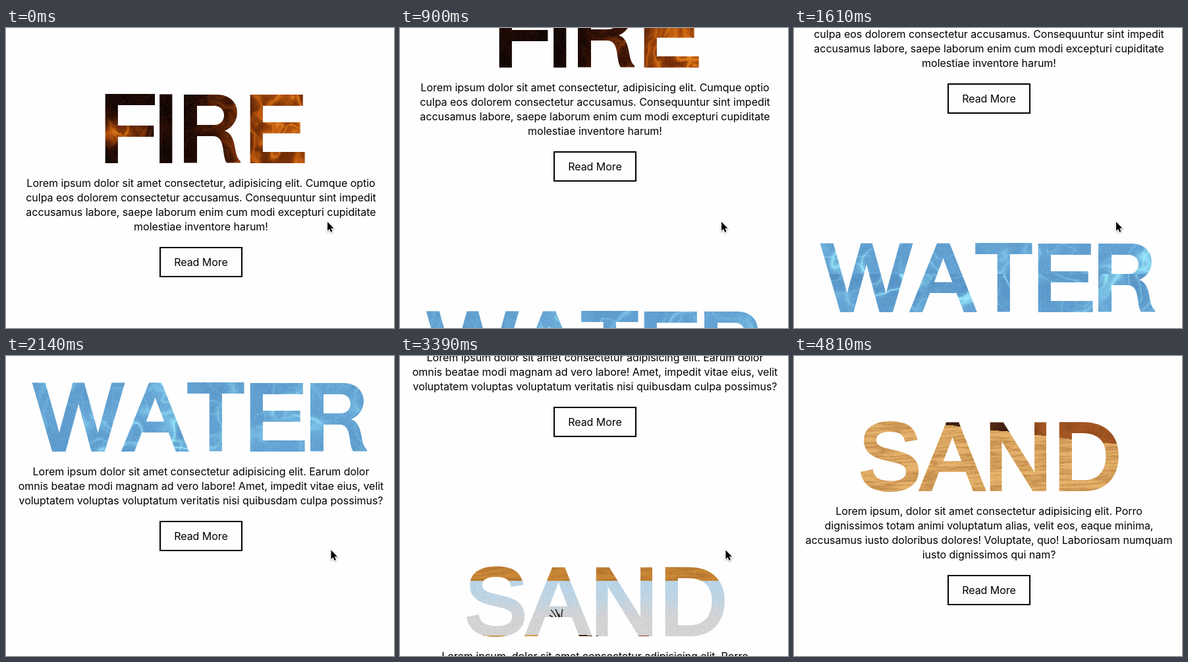
These frames come from a looping animation (589x455 px, 4990 ms). An HTML page with a canvas:

```html
<!DOCTYPE html>
<html lang="en">
<head>
<meta charset="utf-8">
<title>Fire, Water, Sand</title>
<style>
  html, body { margin: 0; width: 100%; height: 100%; overflow: hidden; background: #fefefe; }
  canvas { display: block; }
</style>
</head>
<body>
<canvas id="stage" width="589" height="455"></canvas>
<script>
const W = 589, H = 455, LOOP = 4990, BG = '#fefefe';
const ctx = document.getElementById('stage').getContext('2d');

// Noise
const hash = (x, y) => {
  let n = Math.imul(x, 374761393) + Math.imul(y, 668265263);
  n = Math.imul(n ^ (n >>> 13), 1274126177);
  return ((n ^ (n >>> 16)) >>> 0) / 4294967296;
};
const clamp = v => Math.min(1, Math.max(0, v));
const mix = (a, b, t) => a + (b - a) * t;
const ease = (a, b, v) => { const t = clamp((v - a) / (b - a)); return t * t * (3 - 2 * t); };
function noise(x, y) {
  const i = Math.floor(x), j = Math.floor(y), u = ease(0, 1, x - i), v = ease(0, 1, y - j);
  return mix(mix(hash(i, j), hash(i + 1, j), u), mix(hash(i, j + 1), hash(i + 1, j + 1), u), v);
}
const fbm = (x, y) => noise(x, y) * .55 + noise(x * 2.1, y * 2.1) * .3 + noise(x * 4.3, y * 4.3) * .15;
const ridge = n => 1 - Math.abs(2 * n - 1);
const blend = (a, b, t) => a.map((v, i) => mix(v, b[i], clamp(t)));
const ramp = (stops, v) => {
  const p = clamp(v) * (stops.length - 1), i = Math.min(stops.length - 2, Math.floor(p));
  return blend(stops[i], stops[i + 1], p - i);
};

// Textures stay fixed to the stage while the letters scroll over them
function texture(height, shade, grain, extra) {
  const c = document.createElement('canvas');
  c.width = W; c.height = height;
  const g = c.getContext('2d'), img = g.createImageData(W, height);
  for (let y = 0, k = 0; y < height; y++)
    for (let x = 0; x < W; x++, k += 4) {
      const d = (hash(x + 999, y + 77) - .5) * grain;
      shade(x, y).forEach((v, i) => img.data[k + i] = v + d);
      img.data[k + 3] = 255;
    }
  g.putImageData(img, 0, 0);
  if (extra) extra(g);
  return ctx.createPattern(c, 'repeat');
}

const EMBER = [[8, 3, 2], [50, 17, 5], [122, 50, 8], [196, 94, 14], [242, 160, 52]];
function fireShade(x, y) {
  const wx = x / 34 + 2 * fbm(x / 50, y / 50), wy = y / 48 + 2 * fbm(x / 45 + 9, y / 45);
  const lick = ridge(fbm(wx, wy)) ** 5;
  const glow = ease(240, 430, x) * .45 + .45 * Math.exp(-(((x - 175) / 42) ** 2 + ((y - 157) / 22) ** 2));
  return ramp(EMBER, .06 + glow * (.7 + .4 * fbm(x / 20, y / 20)) + lick * (.08 + glow * .75));
}

function waterShade(x, y) {
  const wx = x / 42 + 1.6 * fbm(x / 60, y / 60), wy = y / 36 + 1.6 * fbm(x / 55 + 5, y / 55 + 3);
  const web = ridge(noise(wx, wy)) ** 9 + .6 * ridge(noise(wx * 1.7 + 8, wy * 1.7)) ** 12;
  const base = blend([84, 142, 194], [104, 168, 216], .4 * ease(0, 60, y) + .6 * fbm(x / 30, y / 30));
  return blend(base, [148, 226, 248], web * (.25 + .75 * ease(.3, .6, fbm(x / 70 + 4, y / 70))));
}

function sandShade(x, y) {
  const n = fbm(x / 16, y / 10);
  if (y < 78 + x / 90 + 3 * noise(x / 40, 1))
    return blend([186, 212, 230], [211, 211, 212], ease(10, 62, y));
  if (x > 222 + (100 - y) * 1.2 && y < 102 + (x - 225) * .11 + 3 * n)
    return blend(blend([34, 16, 10], [78, 36, 14], n), [164, 86, 34], .3 * n + .8 * ease(335, 385, x));
  const wave = ridge(fbm(x / 60, y / 5 + x / 120)) ** 4;
  const sand = blend([230, 180, 108], [203, 137, 55], ease(200, 315, y) + .35 * ease(105, 84, y));
  return blend(sand, [160, 98, 40], wave * .5);
}

function plant(g) {
  g.strokeStyle = '#25211e';
  g.lineWidth = 1.6;
  g.beginPath();
  for (const [x, y, dx] of [[229, 44, 9], [236, 43, 5], [247, 43, -4], [241, 50, 3], [227, 52, 14]]) {
    g.moveTo(x, y);
    g.quadraticCurveTo(x + dx, y + 8, 249, 82);
  }
  g.moveTo(238, 68); g.lineTo(252, 66);
  g.stroke();
}

// Page content: letters are [glyph, left edge]
const sections = [
  { top: 0, fill: texture(H, fireShade, 22),
    title: [['F', 150], ['I', 233], ['R', 270], ['E', 370]],
    lines: ['Lorem ipsum dolor sit amet consectetur, adipisicing elit. Cumque optio',
      'culpa eos dolorem consectetur accusamus. Consequuntur sint impedit',
      'accusamus labore, saepe laborum enim cum modi excepturi cupiditate',
      'molestiae inventore harum!'] },
  { top: 474, fill: texture(373, waterShade, 18),
    title: [['W', 40], ['A', 176], ['T', 275], ['E', 370], ['R', 462]],
    lines: ['Lorem ipsum dolor sit amet consectetur adipisicing elit. Earum dolor',
      'omnis beatae modi magnam ad vero labore! Amet, impedit vitae eius, velit',
      'voluptatem voluptas voluptatum veritatis nisi quibusdam culpa possimus?'] },
  { top: 927, fill: texture(341, sandShade, 16, plant),
    title: [['S', 101], ['A', 190], ['N', 297], ['D', 402]],
    lines: ['Lorem ipsum, dolor sit amet consectetur adipisicing elit. Porro',
      'dignissimos totam animi voluptatum alias, velit eos, eaque minima,',
      'accusamus iusto doloribus dolores! Voluptate, quo! Laboriosam numquam',
      'iusto dignissimos qui nam?'] }
];

// R with an upright curved leg
const letterR = new Path2D('M0 0H50C88 0 90 44 62 55C82 62 74 92 86 101V103.5H65' +
  'C57 92 64 63 44 63H20V103.5H0ZM20 17V46H46C66 46 66 17 46 17Z');

function drawTitle({ title, fill }, y) {
  ctx.fillStyle = ctx.strokeStyle = fill;
  ctx.font = '142px "Liberation Sans", Arial, sans-serif';
  ctx.textAlign = 'left';
  ctx.lineWidth = 6;
  for (const [ch, x] of title) {
    if (ch === 'R') {
      const p = new Path2D();
      p.addPath(letterR, new DOMMatrix([1, 0, 0, 1, x, y + 101]));
      ctx.fill(p, 'evenodd');
    } else {
      const left = x + 3 + ctx.measureText(ch).actualBoundingBoxLeft;
      ctx.fillText(ch, left, y + 201.5);
      ctx.strokeText(ch, left, y + 201.5);
    }
  }
}

function drawSection(s, y) {
  drawTitle(s, y);
  ctx.fillStyle = ctx.strokeStyle = '#000';
  ctx.font = '16px Inter, "Noto Sans", sans-serif';
  ctx.letterSpacing = '-0.03px';
  ctx.textAlign = 'center';
  s.lines.forEach((line, i) => ctx.fillText(line, 296, y + 241 + i * 22));
  const box = y + 244 + s.lines.length * 22;
  ctx.lineWidth = 2;
  ctx.strokeRect(234, box + 1, 124, 44);
  ctx.fillText('Read More', 296, box + 29);
  ctx.letterSpacing = '0px';
}

const arrow = new Path2D('M0 0V13.5L3.1 10.7L5.2 15.6L7.4 14.6L5.3 9.8H9.5Z');
function drawCursor(x, y) {
  ctx.save();
  ctx.translate(x, y);
  ctx.shadowColor = 'rgba(0,0,0,.35)';
  ctx.shadowBlur = 2;
  ctx.shadowOffsetY = 1;
  ctx.strokeStyle = '#fff';
  ctx.lineWidth = 2;
  ctx.stroke(arrow);
  ctx.shadowColor = 'transparent';
  ctx.fillStyle = '#000';
  ctx.fill(arrow);
  ctx.restore();
}

// [start ms, value]; values hold until the next start
const scroll = [[0, 0], [540, 126], [900, 145], [1070, 172], [1250, 195], [1430, 216], [1610, 248],
  [1960, 332], [2140, 534], [2500, 574], [2860, 620], [3030, 662], [3390, 707], [3570, 810],
  [3750, 916], [3920, 927]];
const pointer = [[0, [488, 294]], [1610, [489, 294]], [2140, [493.5, 294.5]], [2320, [494.5, 294.5]],
  [4640, [522, 381]], [4810, null]];
const at = (steps, t) => steps.findLast(s => s[0] <= t)[1];

const start = performance.now();
function frame() {
  const t = Math.max(0, performance.now() - start) % LOOP, pos = at(scroll, t), tip = at(pointer, t);
  ctx.fillStyle = BG;
  ctx.fillRect(0, 0, W, H);
  for (const s of sections) drawSection(s, s.top - pos);
  if (tip) drawCursor(...tip);
  requestAnimationFrame(frame);
}
frame();
</script>
</body>
</html>
```
